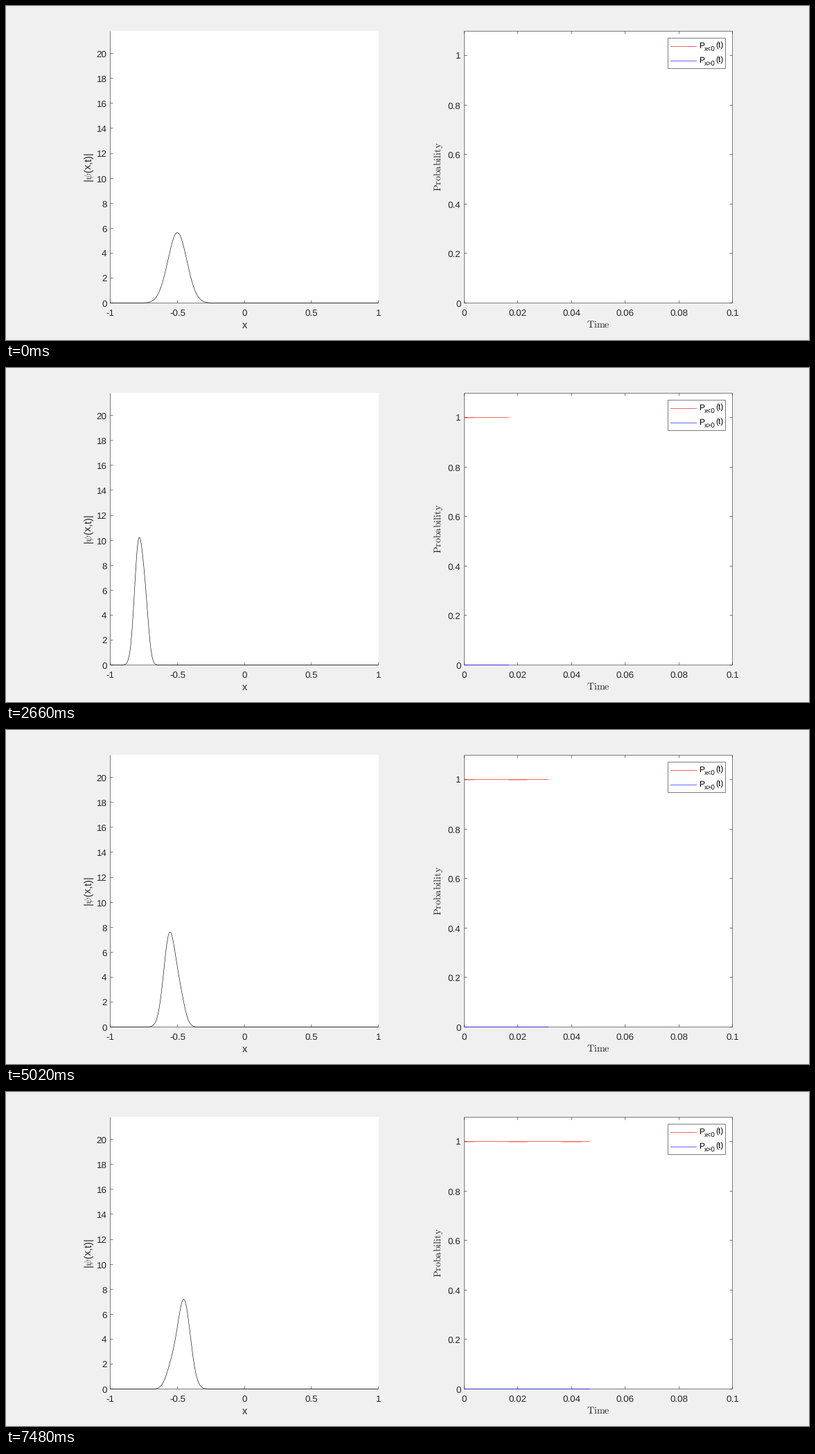
Recreate the animation shown at these times as a matplotlib script. Size 1159x483 px, loop 7500 ms.

```python
import numpy as np
import matplotlib.pyplot as plt
from matplotlib.animation import FuncAnimation
from matplotlib.collections import LineCollection
from matplotlib.patches import Rectangle

W, H, DPI = 1159, 483, 64
FRAMES, INTERVAL = 375, 20
DT = 1.25e-4                      # simulated time per frame
INK = "#262626"
THIN = 0.6                        # line width in pixels

plt.rcParams["font.family"] = "Liberation Sans"
plt.rcParams["mathtext.fontset"] = "cm"
plt.rcParams["text.hinting"] = "none"


def pt(px):
    return px * 72 / DPI


# Plot geometry in pixels, y pointing down
TOP, BOTTOM = 36.5, 429.5
LEFT_X, RIGHT_X, SPAN = 150.5, 661.5, 387
DENSITY_PX = 18.04
PROB_PX = 358

fig = plt.figure(figsize=(W / DPI, H / DPI), dpi=DPI, facecolor="#f0f0f0")
ax = fig.add_axes([0, 0, 1, 1])
ax.set(xlim=(0, W), ylim=(H, 0))
ax.axis("off")


def panel(x0, y0, x1, y1):
    ax.add_patch(Rectangle((x0, y0), x1 - x0, y1 - y0, fc="white", ec="none",
                           snap=False, zorder=0))


def label(x, y, s, size=13.33, ha="center", va="baseline", color=INK, **kw):
    ax.text(x, y, s, fontsize=pt(size), ha=ha, va=va, color=color, **kw)


def strokes(segments, color=INK, z=1):
    lines = LineCollection(segments, colors=color, linewidths=pt(THIN), zorder=z)
    lines.set_snap(False)
    ax.add_collection(lines, autolim=False)


def box(x0, y0, x1, y1):
    return [[(x0, y0), (x1, y0)], [(x1, y0), (x1, y1)],
            [(x1, y1), (x0, y1)], [(x0, y1), (x0, y0)]]


def mid_pixel(v):
    return np.floor(v) + 0.5


def y_ticks(x, values, scale):
    segs = []
    for v in values:
        y = mid_pixel(BOTTOM - v * scale)
        segs.append([(x, y), (x + 4, y)])
        label(x - 5, y + 5, f"{v:g}", ha="right")
    return segs


def x_ticks(x0, values):
    segs = []
    for x, v in zip(np.linspace(x0, x0 + SPAN, len(values)), values):
        x = mid_pixel(x)
        segs.append([(x, BOTTOM), (x, BOTTOM - 4)])
        label(x, 448.3, f"{v:g}")
    return segs


def left_plot():
    panel(150, 36, 538, 430)
    strokes([[(LEFT_X, TOP), (LEFT_X, BOTTOM)],
             [(LEFT_X, BOTTOM), (LEFT_X + SPAN, BOTTOM)]]
            + y_ticks(LEFT_X, range(0, 21, 2), DENSITY_PX)
            + x_ticks(LEFT_X, np.linspace(-1, 1, 5)))
    label(344.5, 466.5, "x", 14.67)
    label(120.5, 233, r"|$\psi$(x,t)|", 14.67, va="center", rotation=90)


def right_plot():
    x1 = RIGHT_X + SPAN
    panel(661, 36, 1049, 430)
    ticks_y = y_ticks(RIGHT_X, np.arange(6) / 5, PROB_PX)
    ticks_x = x_ticks(RIGHT_X, np.arange(6) / 50)
    far_y = [[(x1, y), (x1 - 4, y)] for (_, y), _ in ticks_y]
    far_x = [[(x, TOP), (x, TOP + 4)] for (x, _), _ in ticks_x]
    strokes(box(RIGHT_X, TOP, x1, BOTTOM) + ticks_y + ticks_x + far_y + far_x)
    label(855, 464.5, r"$\mathrm{Time}$", 14.1)
    label(624.5, 232.5, r"$\mathrm{Probability}$", 14.1, va="center", rotation=90)


def legend():
    panel(955, 46, 1039, 91)
    strokes(box(955.5, 46.5, 1038.5, 90.5), z=2)
    for y, color, sign in [(58.5, "red", "<"), (79.5, "blue", ">")]:
        strokes([[(959, y), (997, y)]], color, z=2)
        for x, dy, s, size in [(1000, 0, "P", 12), (1008, 5, f"x{sign}0", 9.6),
                               (1023.8, 0, "(t)", 12)]:
            label(x, y + 2.5 + dy, s, size, ha="left", color="black")


left_plot()
right_plot()
legend()

PERIOD = 0.0229                   # swing of the packet in its well
xs = np.linspace(-1, 1, 801)


def centre(t):
    """Anharmonic swing: a sine with some second harmonic."""
    a = 2 * np.pi * (t - 0.0033) / PERIOD
    return (-0.6 + 0.181 * np.cos(a) + 0.040 * np.sin(a)
            + 0.018 * np.cos(2 * a) - 0.025 * np.sin(2 * a))


def width(t):
    """Breathing at twice the swing rate, slowly dying away."""
    return 0.044 + 0.0267 * np.exp(-t / 0.025) * np.cos(4 * np.pi * t / PERIOD)


def bell(mid, sigma):
    z = (xs - mid) / sigma
    return np.exp(-z * z / 2) / (sigma * np.sqrt(2 * np.pi))


def density(t):
    """A main bell and a shoulder that changes sides."""
    mid, sigma = centre(t), width(t)
    share = 0.3 * abs(np.sin(np.pi * t / 0.0256))
    lean = np.tanh(2.5 * np.sin(np.pi * (t - 0.0131) / PERIOD))
    return ((1 - share) * bell(mid, sigma)
            + share * bell(mid + 2 * sigma * lean, 0.85 * sigma))


def trace(color, **kw):
    line, = ax.plot([], [], color=color, lw=pt(THIN), snap=False, zorder=3,
                    solid_capstyle="butt", **kw)
    return line


packet = trace("black")
red = trace("red")
red_low = trace("red", alpha=0.5)
blue = trace("blue")


def draw(n):
    packet.set_data(LEFT_X + SPAN * (xs + 1) / 2,
                    BOTTOM - density(n * DT) * DENSITY_PX)
    t = np.arange(n + 1) * DT
    px = RIGHT_X + SPAN * t / 0.1
    red.set_data(px, np.full(n + 1, BOTTOM - PROB_PX))
    # the left-hand probability dips slightly once per cycle
    dips = np.cos(2 * np.pi * t / 0.02) > 0.45
    red_low.set_data(px, np.where(dips, BOTTOM - PROB_PX + 1, np.nan))
    blue.set_data(px, np.full(n + 1, BOTTOM))
    return packet, red, red_low, blue


anim = FuncAnimation(fig, draw, frames=FRAMES, interval=INTERVAL, repeat=True,
                     repeat_delay=0, cache_frame_data=False)
plt.show()
```
